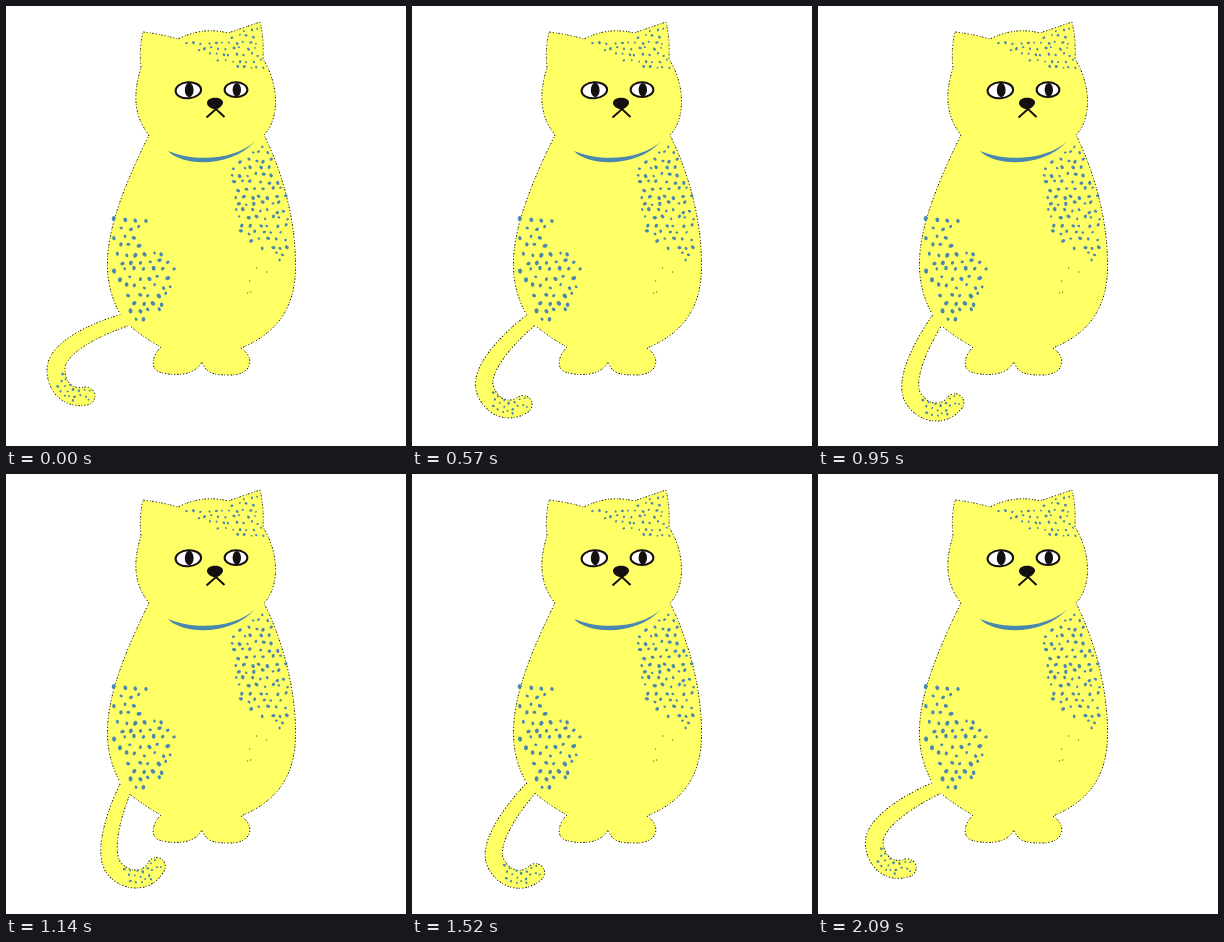
An HTML page that plays this animation: 400 px wide and 440 px high, repeating every 2280 ms.

```html
<!DOCTYPE html>
<html lang="en">
<head>
<meta charset="utf-8">
<title>Yellow cat</title>
<style>
  html, body { margin: 0; width: 100%; height: 100%; overflow: hidden; background: #fff; }
  svg { display: block; width: 100vw; height: 100vh; }
  .fur { fill: #ffff66; stroke: #1c1c0a; stroke-dasharray: 1.2 1.9 1.6 1.3 .8 2.2; }
  .spots, #collar { fill: #4a88ae; }
  .face { fill: #fff; stroke: #140f10; stroke-width: 2; }
  .ink { fill: #140f10; }
</style>
</head>
<body>
<svg viewBox="0 0 400 440">
  <g id="tail"><path id="tailShape" class="fur"/><g id="tailSpots" class="spots"></g></g>
  <!-- The outline is left open where the tail joins. -->
  <path class="fur" d="M125 321Q140 333 155 341C146 350 144 362 153 366C166 370 188 371 196 356
    C200 366 205 369 222 369C246 370 250 352 235 342C272 327 291 300 289.5 255
    C289 212 276 165 258 129C273 114 274 80 257 53Q258 32 254 16L222 27
    C206 23 190 24 172 33Q155 28 137 26Q133 42 135 62C128 84 126 108 143 129
    C102 212 90 262 113 306"/>
  <g id="coat" class="spots"></g>
  <path id="collar" d="M162 145C176 160 224 163 249.500 135C230 153 192 157 162 145Z"/>
  <g class="face">
    <ellipse cx="182.3" cy="84.3" rx="12.8" ry="8" transform="rotate(-4 182 84)"/>
    <ellipse cx="230" cy="83.7" rx="11.4" ry="7.4"/>
    <path d="M200.5 111.5L210 103L218.5 111" fill="none"/>
  </g>
  <g class="ink">
    <ellipse cx="183.2" cy="84" rx="4.4" ry="7.2"/>
    <ellipse cx="230.8" cy="83.7" rx="4.2" ry="6.8"/>
    <path d="M201 97C201 90 217 90 217 96.5C217 100 212 103 209.5 103.5C206 103 201 100.5 201 97Z"/>
  </g>
  <path d="M250 262h1.2M260 266h1.2M243 275h1.2M244 286h1.2M241 287h1.2" stroke="#5a5a20"/>
</svg>
<script>
const STEP = 190, LAST_POSE = 6;
const PIVOT = "118 312";
const $ = id => document.getElementById(id);
const points = text => text.split(" ").map(p => p.split(",").map(Number));

// Position and direction on a cubic curve.
function onCurve([a, b, c, d], t) {
  const s = 1 - t;
  const at = k => s * s * s * a[k] + 3 * s * s * t * b[k] + 3 * s * t * t * c[k] + t * t * t * d[k];
  const slope = k => s * s * (b[k] - a[k]) + 2 * s * t * (c[k] - b[k]) + t * t * (d[k] - c[k]);
  return { x: at(0), y: at(1), angle: Math.atan2(slope(1), slope(0)) };
}

// A tapered tail: both sides of a two-part spine, joined by a round tip.
function tailPath() {
  const spine = [points("122,313 92,322 51,341 50,362"), points("50,362 49,382 64,394 80,390")];
  const left = [], right = [], tip = [], n = 12;
  const offset = (p, turn, r) => [p.x + r * Math.cos(p.angle + turn), p.y + r * Math.sin(p.angle + turn)];
  let p;
  for (let i = 0; i <= 2 * n; i++) {
    p = onCurve(spine[i < n ? 0 : 1], (i < n ? i : i - n) / n);
    const r = 6.5 + 2.5 * Math.min(1, i / n);
    left.push(offset(p, Math.PI / 2, r));
    right.unshift(offset(p, -Math.PI / 2, r));
  }
  for (let i = 1; i < n; i++) tip.push(offset(p, Math.PI * (0.5 - i / n), 9));
  return "M" + [...left, ...tip, ...right].join("L");
}

function random(seed) {
  return () => (seed = (seed * 16807) % 2147483647) / 2147483647;
}

function inside(x, y, poly) {
  let hit = false;
  poly.forEach(([ax, ay], i) => {
    const [bx, by] = poly[(i + 1) % poly.length];
    if ((ay > y) !== (by > y) && x < ax + (bx - ax) * (y - ay) / (by - ay)) hit = !hit;
  });
  return hit;
}

// Loose staggered rows of dabs that fill an area.
function spots(group, area, gap, size, seed) {
  const poly = points(area), rnd = random(seed);
  const xs = poly.map(p => p[0]), ys = poly.map(p => p[1]);
  let row = 0, out = "";
  for (let y = Math.min(...ys); y < Math.max(...ys); y += gap * 0.88, row++) {
    for (let x = Math.min(...xs) + (row % 2) * gap / 2; x < Math.max(...xs); x += gap) {
      const px = x + (rnd() - 0.5) * gap * 0.45, py = y + (rnd() - 0.5) * gap * 0.45;
      const r = size * (0.75 + rnd() * 0.5), turn = rnd() * 180;
      if (!inside(px, py, poly)) continue;
      out += `<ellipse rx="${r * 1.15}" ry="${r * 0.9}" transform="translate(${px} ${py}) rotate(${turn})"/>`;
    }
  }
  group.innerHTML += out;
}

$("tailShape").setAttribute("d", tailPath());
spots($("coat"), "178,37 220,29 252,18 256,50 266,68 205,55", 7, 1.15, 41);
spots($("coat"), "246,142 262,140 284,200 282,262 229,224 225,160", 8.2, 1.5, 97);
spots($("coat"), "108,206 143,214 133,240 160,250 175,268 154,310 130,318 105,262", 9.4, 1.8, 23);
spots($("tailSpots"), "56,364 70,382 87,381 86,395 62,396 49,381", 5.8, 1.15, 65);

// The tail swings out a little faster with every pose, then back the same way.
function draw(now) {
  const step = Math.floor(now / STEP) % (2 * LAST_POSE);
  const pose = LAST_POSE - Math.abs(LAST_POSE - step);
  const angle = 6.3 * pose + 0.28 * pose * pose;
  $("tail").setAttribute("transform", `rotate(${-angle} ${PIVOT})`);
}

function tick() {
  draw(performance.now());
  requestAnimationFrame(tick);
}
tick();
</script>
</body>
</html>
```
